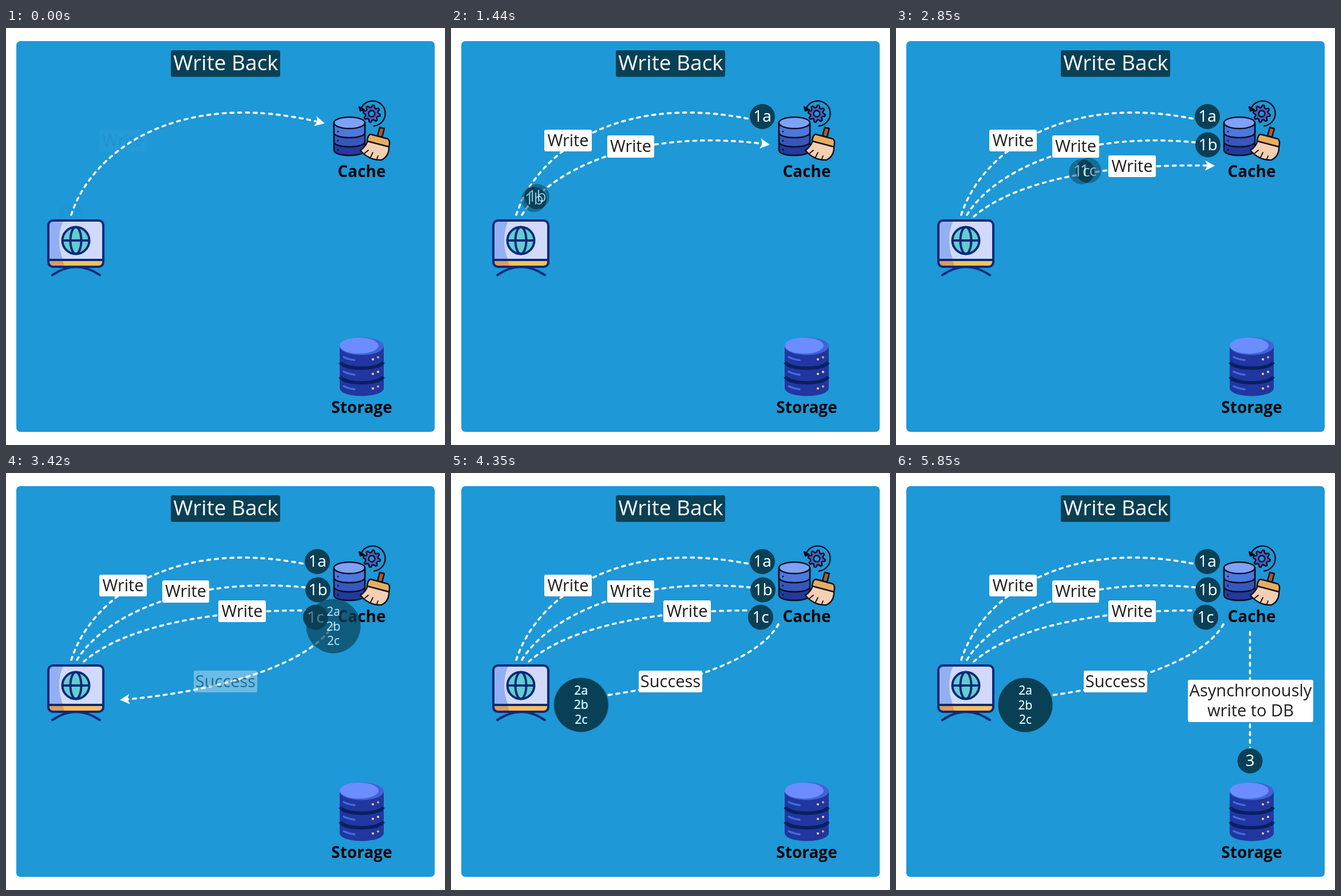
An HTML page for the animation above (5880 ms loop, 767 by 730 pixels).

```html
<!DOCTYPE html>
<html lang="en">
<head>
<meta charset="utf-8">
<title>Write Back</title>
<style>
  html, body { margin: 0; width: 100%; height: 100%; overflow: hidden; background: #fff; }
  svg { display: block; width: 100vw; height: 100vh; }
  text { font-family: "Open Sans", "Noto Sans", sans-serif; text-anchor: middle; }
  .name { font-size: 28px; font-weight: 700; fill: #06080c; }
  .label rect { fill: #fff; }
  .label text { font-size: 29px; fill: #1d1d1f; }
  .route { fill: none; stroke: #fff; stroke-width: 3.6; stroke-linecap: round; stroke-dasharray: 5.5 8; }
  .badge { isolation: isolate; }
  .badge circle, .badge text { opacity: .5; mix-blend-mode: plus-lighter; }
  .badge circle { fill: #0a4055; }
  .badge text { fill: #fff; }
</style>
</head>
<body>
<svg viewBox="0 0 767 730">
  <defs>
    <marker id="arrow" markerUnits="userSpaceOnUse" markerWidth="24" markerHeight="24"
            viewBox="-12 -12 24 24" orient="auto">
      <path d="M-8-9L9 0L-8 9L-4 0Z" fill="#fff"/>
    </marker>
    <clipPath id="screen"><rect x="74" y="337" width="96" height="81" rx="8"/></clipPath>
  </defs>

  <rect x="18" y="23" width="731" height="684" rx="7" fill="#1e98d7"/>
  <rect x="288" y="39" width="191" height="46.500" rx="3" fill="#0a4055"/>
  <text x="384" y="74" font-size="37" fill="#fff">Write Back</text>

  <!-- client -->
  <g stroke="#0a2a78" stroke-width="4" stroke-linecap="round" fill="none">
    <path d="M81 432.500Q122 404 164 432.500"/>
    <g clip-path="url(#screen)" stroke="none">
      <path d="M74 337h96v70h-96z" fill="#d1dafc"/>
      <path d="M74 337h26q-14 34 0 70h-26z" fill="#93aff4"/>
      <path d="M74 406h96v14h-96z" fill="#fcbf5d"/>
      <path d="M74 406h25l4 14h-29z" fill="#df9a5c"/>
    </g>
    <path d="M75 406H169"/>
    <rect x="74" y="337" width="96" height="81" rx="8"/>
    <g id="globe" transform="translate(122 372)">
      <circle r="23.500" fill="#63cdd0"/>
      <ellipse id="meridian" ry="23.500"/>
      <path d="M-23 0H23"/>
    </g>
  </g>

  <!-- cache -->
  <g stroke="#0a0d1c" stroke-width="2.400" stroke-linejoin="round" stroke-linecap="round">
    <path d="M573 166V214C573 226 627 226 627 214V166Z" fill="#233a9c"/>
    <path d="M573 166V199C573 211 627 211 627 199V166Z" fill="#3557be"/>
    <path d="M573 166V183C573 195 627 195 627 183V166Z" fill="#4c77dc"/>
    <ellipse cx="600" cy="166" rx="27" ry="10" fill="#7ea2f7"/>
    <path d="M580 181v.5M580 197v.5M580 213v.5"/>
    <path d="M620 142A22 22 0 1 1 643 171.500" fill="none"/>
    <path d="M617 138l2 7l7-2z" fill="#0a0d1c"/>
    <path id="gear" fill="#4660c4" transform="translate(639 150)"/>
    <circle cx="639" cy="150" r="5.500" fill="#1e98d7"/>
    <path d="M653 174l8 2l-4 15l-8-2z" fill="#a9592b"/>
    <path d="M632 197L669 207Q670 224 656 231Q634 232 619 214Q629 208 632 197Z" fill="#f4cfb2"/>
    <path d="M637 186L667 194Q672 197 669 208L631 198Q632 187 637 186Z" fill="#e7ad61"/>
    <path d="M627 219l6-5M637 226l4-8M648 229l2-5" fill="none" stroke-width="1.800"/>
  </g>
  <text class="name" x="621.500" y="260.500">Cache</text>

  <!-- storage -->
  <path d="M583 557V630C583 649 660 649 660 630V557Z" fill="#2136a0"/>
  <g id="tiers" fill="none" stroke-linecap="round"></g>
  <ellipse cx="621.500" cy="557" rx="38.500" ry="15.500" fill="#4262d6"/>
  <ellipse cx="617" cy="556" rx="34" ry="14" fill="#6b8dfd"/>
  <text class="name" x="621.500" y="674">Storage</text>

  <g id="steps"></g>
</svg>

<script>
const LOOP = 5880, TRAVEL = 930, BLEND = 1000 / 60;
const NS = "http://www.w3.org/2000/svg";
const byId = id => document.getElementById(id);
const clamp = v => Math.max(0, Math.min(1, v));
const easeSine = u => (1 - Math.cos(Math.PI * clamp(u))) / 2;
const easeQuad = u => u < .5 ? 2 * u * u : 1 - 2 * (1 - u) ** 2;

// show: route appears; go: badge leaves; box: label x, y, width, height
const steps = [
  { show: 0, go: 124, route: "M114 327C150 215 300 105 548 165",
    track: "M114 327C150 215 300 105 544 155",
    box: [163, 178, 83, 38], lines: ["Write"], badge: ["1a"] },
  { show: 1150, go: 1269, route: "M124 327C170 252 320 174 548 203",
    track: "M124 327C170 252 320 176 545 204.5",
    box: [273, 188, 82, 39], lines: ["Write"], badge: ["1b"] },
  { show: 2270, go: 2385, route: "M136 330C210 266 370 237 548 241",
    track: "M136 330C210 262 370 225 541 252.5",
    box: [371, 223, 83, 38], lines: ["Write"], badge: ["1c"] },
  { show: 3340, go: 3455, route: "M572 265C535 330 390 380 208 396.500",
    track: "M572 268C535 338 400 388 226 406",
    box: [328, 346, 111, 38], lines: ["Success"], badge: ["2a", "2b", "2c"] },
  { show: 4480, go: 4598, route: "M618.500 278V512", track: "M618.500 258V504",
    box: [510, 362, 219, 74], lines: ["Asynchronously", "write to DB"], badge: ["3"] }
];

function add(parent, name, attrs = {}, text = "") {
  const node = document.createElementNS(NS, name);
  for (const key in attrs) node.setAttribute(key, attrs[key]);
  node.textContent = text;
  return parent.appendChild(node);
}

function addBadgeCopy(parent, words) {
  const copy = add(parent, "g"), single = words.length === 1;
  add(copy, "circle", { r: single ? 22 : 47.5 });
  words.forEach((word, i) => add(copy, "text", {
    y: single ? 9 : -18 + 25.5 * i, "font-size": single ? 28 : 21
  }, word));
  return copy;
}

for (const step of steps) {
  const [x, y, width, height] = step.box;
  step.group = add(byId("steps"), "g");
  add(step.group, "path", { class: "route", d: step.route, "marker-end": "url(#arrow)" });
  step.label = add(step.group, "g", { class: "label" });
  add(step.label, "rect", { x, y, width, height, rx: 3 });
  step.lines.forEach((line, i) =>
    add(step.label, "text", { x: x + width / 2, y: y + 28.5 + 35 * i }, line));
  step.marker = add(step.group, "g", { class: "badge" });
  step.copies = [0, 1].map(() => addBadgeCopy(step.marker, step.badge));
  step.curve = document.createElementNS(NS, "path");
  step.curve.setAttribute("d", step.track);
  step.length = step.curve.getTotalLength();
}

function buildIcons() {
  const points = [];
  for (let i = 0; i < 32; i++) {
    const r = i % 4 < 2 ? 15 : 11, a = (i + .5) * Math.PI / 16;
    points.push(`${r * Math.cos(a)} ${r * Math.sin(a)}`);
  }
  byId("gear").setAttribute("d", `M${points.join("L")}Z`);

  const tiers = byId("tiers");
  for (let i = 0; i < 3; i++) {
    const y = 580 + 25.5 * i;
    if (i < 2) add(tiers, "path", {
      d: `M584 ${y + 5}C590 ${y + 19} 653 ${y + 19} 659 ${y + 5}`,
      stroke: "#08205f", "stroke-width": 6, "stroke-linecap": "butt"
    });
    add(tiers, "path", { d: `M590 ${y - 4}Q598 ${y} 609 ${y + 1.5}`, stroke: "#4669dc", "stroke-width": 3.5 });
    add(tiers, "circle", { cx: 641, cy: y, r: 2, fill: "#ffd98a" });
    add(tiers, "circle", { cx: 650, cy: y - 3.5, r: 2, fill: i === 1 ? "#ffd98a" : "#e7a957" });
  }
}

function globeAngle(t) {
  const p = t % 1470;
  return p < 650 ? -10 * easeSine((p - 480) / 170)
                 : -10 + 190 * easeQuad(clamp((p - 650) / 700));
}

function render(t) {
  const angle = globeAngle(t);
  byId("globe").setAttribute("transform", `translate(122 372) rotate(${angle})`);
  byId("meridian").setAttribute("rx", Math.min(23.5, 9.5 + 20 * Math.sin(angle * Math.PI / 180) ** 2));

  for (const step of steps) {
    step.group.style.display = t >= step.show ? "" : "none";
    step.label.style.opacity = clamp((t - step.show) / 250 + .02);
    step.marker.style.opacity = clamp((t - step.show) / 120);
    step.copies.forEach((copy, i) => {
      const u = (t - step.go + (i - .5) * BLEND) / TRAVEL;
      const { x, y } = step.curve.getPointAtLength(step.length * easeSine(u));
      copy.setAttribute("transform", `translate(${x} ${y})`);
    });
  }
}

buildIcons();
const start = performance.now();
function tick() {
  render((performance.now() - start) % LOOP);
  requestAnimationFrame(tick);
}
render(0);
requestAnimationFrame(tick);
</script>
</body>
</html>
```
